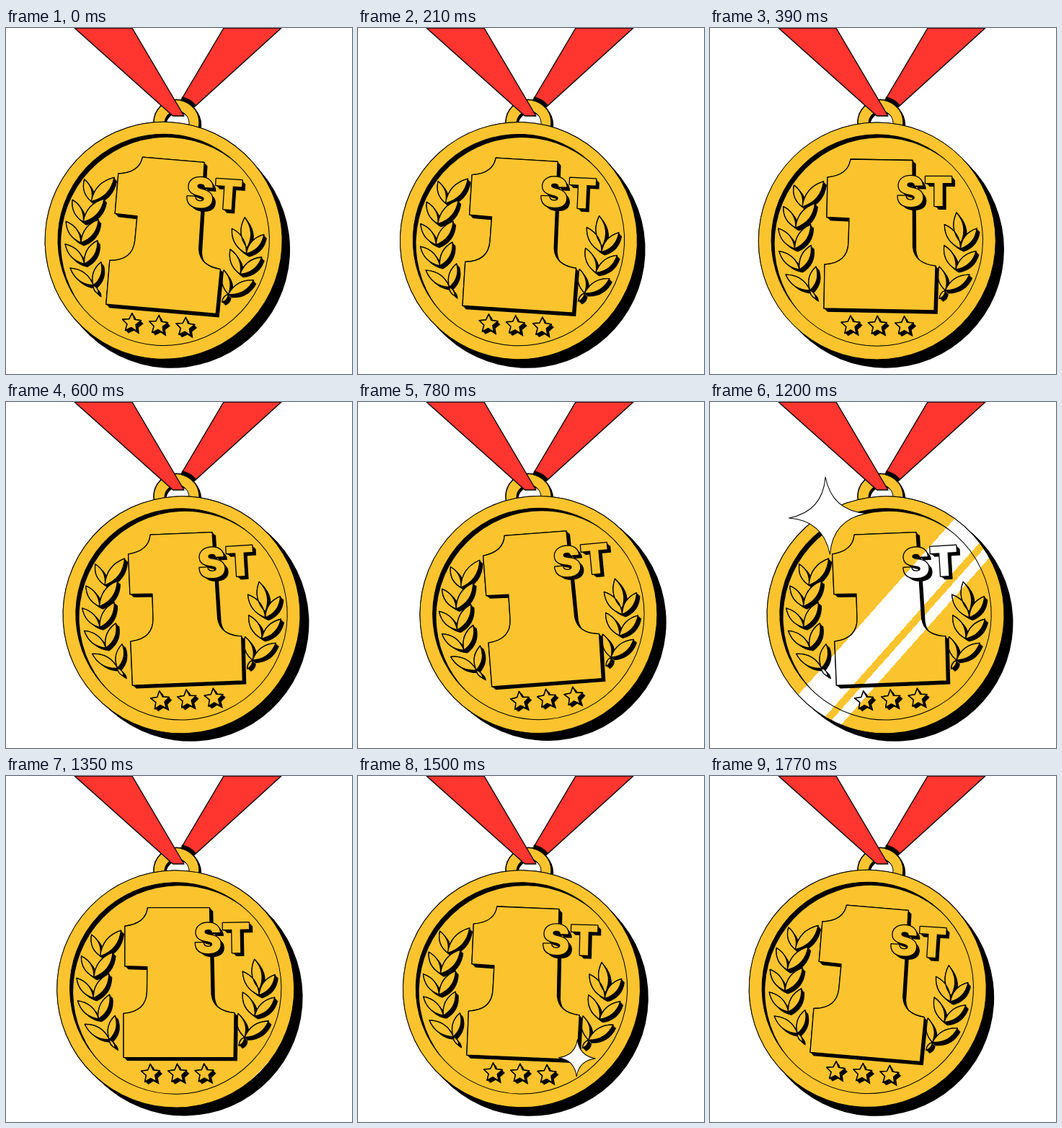
An HTML page with a canvas for the animation above (1.8 s loop, 480 px wide and 480 px high).

```html
<!DOCTYPE html>
<html lang="en">
<head>
<meta charset="utf-8">
<title>First place medal</title>
<style>
  html, body { margin: 0; width: 100%; height: 100%; overflow: hidden; background: #fff; }
  canvas { display: block; width: 480px; height: 480px; }
</style>
</head>
<body>
<canvas id="stage" width="480" height="480"></canvas>
<script>
const ctx = document.getElementById('stage').getContext('2d');
const GOLD = '#fbc42e', RED = '#ff352f', INK = '#000', WHITE = '#fff';
const LOOP = 1800, STEP = 30, RAD = Math.PI / 180;
const PIVOT = [235, 97], CENTER = [231.8, 295.5];

const disc = circle(...CENTER, 164.5);
const recess = circle(231.8, 294.5, 146.7);
const numeral = new Path2D(
  'M195 182 L281 183.5 L281.5 304 Q284 327 313 330 L311 392 L158 389 ' +
  'L159 328 Q191 326 192 298 L193 264 L162 262.5 L163 207 Q192 204 195 182 Z');

const stars = new Path2D();
for (let i = 0; i < 3; i++) addStar(stars, 195 + i * 37.3, 412.5 + i * 0.4, 13.5);

// The right branch mirrors the lower part of the left one, under a single top leaf
const leftLaurel = new Path2D(), rightLaurel = new Path2D();
addBranch(leftLaurel, 0, x => x);
addBranch(rightLaurel, 2, x => 465 - x);
addLeaf(rightLaurel, 348, 298, 342, 256);

function circle(x, y, r) {
  const p = new Path2D();
  p.arc(x, y, r, 0, Math.PI * 2);
  return p;
}

function addStar(path, x, y, r) {
  for (let k = 0; k < 10; k++) {
    const a = k * Math.PI / 5 - Math.PI / 2, d = k % 2 ? r * 0.47 : r;
    path[k ? 'lineTo' : 'moveTo'](x + d * Math.cos(a), y + d * Math.sin(a));
  }
  path.closePath();
}

function addLeaf(path, x, y, tipX, tipY) {
  const mx = (x + tipX) / 2, my = (y + tipY) / 2;
  const nx = (y - tipY) * 0.32, ny = (tipX - x) * 0.32;
  path.moveTo(tipX, tipY);
  path.quadraticCurveTo(mx + nx, my + ny, x, y);
  path.quadraticCurveTo(mx - nx, my - ny, tipX, tipY);
  path.closePath();
}

// Pairs of leaves along a bent stem; tilt is measured from upright
function addBranch(path, first, mirror) {
  for (let i = first; i < 5; i++) {
    const x = 128 - 13.1 * i + 3.94 * i * i, y = 248 + 29 * i;
    const leaf = (tilt, len) => addLeaf(path, mirror(x), y,
      mirror(x + len * Math.sin(tilt * RAD)), y - len * Math.cos(tilt * RAD));
    leaf(-21 - 9 * i, 32 + 2 * i);
    leaf(40 - 1.6 * i * i, 46 - 3 * i);
    if (i === 4) leaf(145, 14);
  }
}

// Black block shadow towards the lower right, then the face
function extrude(depth, face, draw) {
  ctx.fillStyle = INK;
  for (let d = depth; d > 0; d -= 0.75) {
    ctx.save();
    ctx.translate(d, d);
    draw('fill');
    ctx.restore();
  }
  ctx.fillStyle = face;
  draw('stroke');
  draw('fill');
}

function solid(path, depth, face, line = 1.3) {
  ctx.lineWidth = line;
  extrude(depth, face, op => ctx[op](path));
  ctx.stroke(path);
}

// A sunken shape whose upper left wall shows as a black crescent
function sunken(path, floor, face) {
  ctx.fillStyle = INK;
  ctx.fill(path);
  ctx.save();
  ctx.clip(path);
  ctx.fillStyle = face;
  ctx.fill(floor);
  ctx.restore();
  ctx.lineWidth = 1;
  ctx.stroke(path);
}

// A strap from the top edge (left, right) down to its cut end
function ribbon(left, right, endRight, endLeft) {
  ctx.beginPath();
  ctx.moveTo(left, 0);
  ctx.lineTo(right, 0);
  ctx.lineTo(...endRight);
  ctx.lineTo(...endLeft);
  ctx.closePath();
  ctx.fillStyle = RED;
  ctx.fill();
  ctx.lineWidth = 1.3;
  ctx.stroke();
}

function ribbonAndRing() {
  ribbon(302, 382, [263, 108], [244, 98]);
  solid(circle(236.5, 131, 31.5), 3.2, GOLD);
  sunken(circle(237, 132, 17), circle(239.5, 135, 17), WHITE);
  ctx.beginPath();
  ctx.arc(236.5, 131, 33.5, -78 * RAD, -40 * RAD);
  ctx.lineWidth = 6;
  ctx.stroke();
  ribbon(95, 175, [247, 122], [231.5, 122]);
}

// Gold with two hard-edged white bands at 45 degrees
function shinyGold(shift) {
  const [x, y] = CENTER, half = 400, u = Math.SQRT1_2 * half;
  const g = ctx.createLinearGradient(x - u, y - u, x + u, y + u);
  let color = GOLD;
  g.addColorStop(0, color);
  for (const edge of [-17, 31, 41, 55]) {
    const at = (edge + shift + half) / (2 * half);
    g.addColorStop(at, color);
    color = color === GOLD ? WHITE : GOLD;
    g.addColorStop(at, color);
  }
  g.addColorStop(1, GOLD);
  return g;
}

function lettering(face) {
  ctx.font = '900 57px Inter, "Liberation Sans", sans-serif';
  ctx.lineWidth = 2.6;
  for (const [ch, x] of [['S', 259], ['T', 297.5]]) {
    extrude(5, face, op => ctx[op + 'Text'](ch, x, 246.5));
  }
}

function sparkle(x, y, h) {
  if (h <= 0) return;
  const c = h * 0.12;
  ctx.beginPath();
  ctx.moveTo(x, y - h);
  for (let k = 0; k < 4; k++) {
    const a = k * Math.PI / 2, cos = Math.cos(a), sin = Math.sin(a);
    ctx.quadraticCurveTo(x + c * (cos + sin), y + c * (sin - cos), x + h * cos, y + h * sin);
  }
  ctx.closePath();
  ctx.fillStyle = WHITE;
  ctx.lineWidth = 1;
  ctx.fill();
  ctx.stroke();
}

function pulse(t, start, peak, end, size) {
  return size * Math.min((t - start) / (peak - start), (end - t) / (end - peak));
}

function swing(t) {
  return 4.8 * Math.cos(t / LOOP * Math.PI * 2);
}

function medal(t) {
  const shift = (t - 1200) * 1.2;
  const face = Math.abs(shift) < 250 ? shinyGold(shift) : GOLD;
  ctx.save();
  ctx.translate(...PIVOT);
  ctx.rotate((swing(t) - swing(390)) * RAD);
  ctx.translate(-PIVOT[0], -PIVOT[1]);

  solid(disc, 11.7, face, 1);
  sunken(recess, circle(236.6, 299.2, 147), face);
  solid(leftLaurel, 4.5, face);
  solid(rightLaurel, 4.5, face);
  solid(numeral, 4.7, face);
  solid(stars, 4, face, 1.5);
  lettering(face);

  sparkle(159.8, 153.4, pulse(t, 900, 1110, 1350, 86));
  sparkle(311, 389.5, pulse(t, 1440, 1590, 1760, 64));
  ctx.restore();
}

function render(now) {
  let t = Math.floor((now % LOOP) / STEP) * STEP;
  if (t < 60) t = 0;
  ctx.clearRect(0, 0, 480, 480);
  ctx.strokeStyle = INK;
  ctx.lineJoin = 'round';
  ribbonAndRing();
  medal(t);
}

const begin = performance.now();
function tick() {
  render(performance.now() - begin);
  requestAnimationFrame(tick);
}
tick();
</script>
</body>
</html>
```
